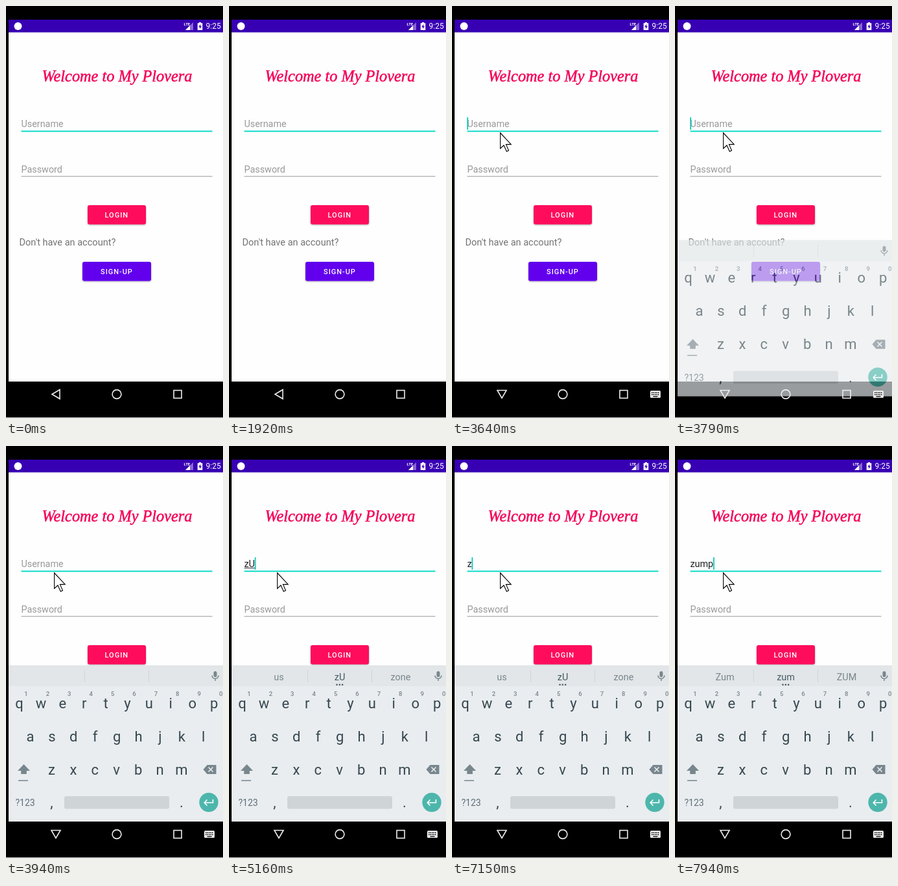
Write an HTML page that moves like this. It is 335x633 px and loops after 8000 ms.

```html
<!DOCTYPE html>
<html lang="en">
<head>
<meta charset="utf-8">
<title>Login screen</title>
<style>
  html, body { margin: 0; width: 100%; height: 100%; overflow: hidden; background: #000; }
  svg { display: block; width: 335px; height: 633px; }
  text { font-family: Roboto, sans-serif; white-space: pre; }
  .title { font: italic 24.3px "Liberation Serif", serif; fill: #f50057; stroke: #f50057; stroke-width: .5; text-anchor: middle; }
  .field { font-size: 14.4px; }
  .hint { fill: #999; }
  .button { font-size: 11px; font-weight: 500; letter-spacing: 1px; fill: #fff; }
  .key { font-size: 22px; fill: #37474f; text-anchor: middle; }
  .digit { font-size: 9.5px; font-weight: 500; fill: #78868d; text-anchor: middle; }
  .word { font-size: 14.4px; fill: #78868d; text-anchor: middle; }
  .word.main { fill: #455a64; }
</style>
</head>
<body>
<svg viewBox="0 0 335 633">
  <defs>
    <filter id="shadow" x="-10%" y="-20%" width="120%" height="150%">
      <feDropShadow dx="0" dy="1" stdDeviation=".8" flood-opacity=".35"/>
    </filter>
  </defs>
  <rect width="335" height="633"/>
  <rect y="632" width="335" height="1" fill="#ccc"/>
  <rect x="4" y="40" width="331" height="537" fill="#fefefe"/>

  <!-- Status bar -->
  <rect x="4" y="21" width="331" height="19.5" fill="#3700b3"/>
  <g fill="#fff">
    <circle cx="18.5" cy="31" r="6"/>
    <text x="274.5" y="30" font-size="6" font-weight="700">LTE</text>
    <path d="M289 25V37H277Z" opacity=".4"/>
    <path d="M284 30V37H277Z"/>
    <path d="M298 25h3v1.3h2.3v10.7h-7.6V26.300H298Z"/>
    <path d="M300.300 28l-3 4.200h1.900v3l2.700-4.200h-1.600Z" fill="#3700b3"/>
    <text x="308.5" y="35.3" font-size="12">9:25</text>
  </g>

  <!-- Form -->
  <text class="title" x="171.500" y="115.500">Welcome to My Plovera</text>
  <text class="field hint" id="hint" x="23.400" y="186.300">Username</text>
  <text class="field" id="typed" x="23.400" y="186.300" fill="#212121"></text>
  <rect id="underline" x="23.500" y="187" height="1" fill="#333"/>
  <rect id="caret" y="171" width="1.700" height="19" fill="#03c9b6"/>
  <rect x="23.500" y="191.500" width="295" height="1.900" fill="#03dac5"/>
  <text class="field hint" x="23.400" y="255.600">Password</text>
  <rect x="23.500" y="261.300" width="295" height="1" fill="#999"/>
  <rect x="126" y="306" width="90" height="29.500" rx="3" fill="#ff0a5c" filter="url(#shadow)"/>
  <text class="button" x="152.500" y="325">LOGIN</text>
  <text x="20.500" y="368" font-size="14.550" fill="#737373">Don't have an account?</text>
  <rect x="118" y="393" width="106" height="29.500" rx="3" fill="#6200ee" filter="url(#shadow)"/>
  <text class="button" x="146" y="412">SIGN-UP</text>

  <!-- Soft keyboard -->
  <g id="keyboard">
    <rect x="4" y="337" width="331" height="240" fill="#e9edf0"/>
    <rect x="4" y="337" width="331" height="32" fill="#e2e6e8"/>
    <path d="M121.500 344V363M220.500 344V363" stroke="#cfd4d7"/>
    <g id="keys"></g>
    <g id="suggestions">
      <text class="word" x="77" y="359.500"></text>
      <text class="word main" x="171" y="359.500"></text>
      <text class="word" x="265" y="359.500"></text>
      <path d="M166.500 366.700h.01M170.800 366.700h.01M175.100 366.700h.01" stroke="#455a64" stroke-width="2.600" stroke-linecap="round"/>
    </g>
    <g fill="#78868d">
      <rect x="320.500" y="346" width="5" height="9" rx="2.500"/>
      <path d="M318 352.500a5 5 0 0 0 10 0M323 357.500V361" fill="none" stroke="#78868d" stroke-width="1.500"/>
      <path d="M27.500 489L37 499H31.800V504H23.200V499H18Z"/>
      <rect x="19" y="513.300" width="15" height="1.500"/>
      <path d="M310.500 490H324.500V504H310.500L304.500 497Z"/>
    </g>
    <path d="M312.500 493.500l7 7m0-7l-7 7" stroke="#e9edf0" stroke-width="1.600"/>
    <text x="14.500" y="553" font-size="14" fill="#5f6f77">?123</text>
    <rect x="90" y="538" width="162" height="19.500" rx="3" fill="#cfd4d7"/>
    <circle cx="313" cy="547.500" r="14.700" fill="#4db6ac"/>
    <path d="M319.500 543V548H306.500M310.500 543.500L306.200 548L310.500 552.500" fill="none" stroke="#fff" stroke-width="1.600"/>
  </g>

  <!-- Navigation bar -->
  <g fill="none" stroke="#eee" stroke-width="1.600">
    <path id="back"/>
    <circle cx="171" cy="596.500" r="6.900"/>
    <rect x="259" y="590.500" width="12" height="12"/>
  </g>
  <g id="imeIcon">
    <rect x="306" y="591" width="16" height="11" rx="1.500" fill="#eee"/>
    <path d="M308 594H320M308 597H320" stroke="#000" stroke-width="1.500" stroke-dasharray="1.500 1"/>
    <path d="M310.500 600H317.500" stroke="#000" stroke-width="1.300"/>
  </g>

  <path id="pointer" d="M.6 1V25L6 20L10.300 29.500L13.500 28L9.400 18.600H17.200Z" fill="#fff" stroke="#000" stroke-width="1.100"/>
</svg>
<script>
const LOOP = 8000;
const $ = id => document.getElementById(id);
const show = (el, on) => el.setAttribute("visibility", on ? "visible" : "hidden");

function addText(cls, x, y, label) {
  const el = document.createElementNS("http://www.w3.org/2000/svg", "text");
  el.setAttribute("class", cls);
  el.setAttribute("x", x);
  el.setAttribute("y", y);
  el.textContent = label;
  $("keys").append(el);
}

const PITCH = 33.4;
[["qwertyuiop", 20.5, 402.5], ["asdfghjkl", 37.5, 453.5], ["zxcvbnm", 70.5, 504.5]]
  .forEach(([row, x, y]) => [...row].forEach((c, i) => addText("key", x + i * PITCH, y, c)));
[..."1234567890"].forEach((c, i) => addText("digit", 31 + i * PITCH, 384, c));
addText("key", 70.5, 555, ",");
addText("key", 271, 555, ".");

// Tracks of [start time, value]; each value holds until the next start.
const caretToggles = [430, 960, 1520, 1920, 2480, 3030, 3490, 3940, 4500, 5590, 5870, 6400, 6900];
const typing = [[0, ""], [4640, "z"], [5010, "zU"], [5870, ""], [7150, "z"],
  [7420, "zu"], [7660, "zum"], [7940, "zump"]];
const words = [[0, ""], [4890, "us z is"], [5160, "us zU zone"], [7300, "us z is"],
  [7540, "us zu zone"], [7810, "Zum zum ZUM"]];
const underlined = [[0, false], [5160, true], [5870, false], [7540, true],
  [7660, false], [7810, true], [7940, false]];
const pointerAt = [[0, null], [2730, [29, 210]], [2880, [55, 207]], [3030, [74, 194]]];

const valueAt = (track, t) => track.findLast(([start]) => start <= t)[1];

function render(t) {
  const typed = valueAt(typing, t);
  $("typed").textContent = typed;
  show($("hint"), !typed);
  const width = typed ? $("typed").getComputedTextLength() : 0;
  $("caret").setAttribute("x", 23.3 + width);
  show($("caret"), caretToggles.filter(start => start <= t).length % 2 === 1);
  $("underline").setAttribute("width", width);
  show($("underline"), valueAt(underlined, t));

  const line = valueAt(words, t);
  const parts = line.split(" ");
  show($("suggestions"), line !== "");
  $("suggestions").querySelectorAll("text").forEach((el, i) => el.textContent = parts[i] || "");

  const sliding = t < 3940;
  $("keyboard").setAttribute("display", t < 3790 ? "none" : "inline");
  $("keyboard").setAttribute("opacity", sliding ? 0.66 : 1);
  $("keyboard").setAttribute("transform", `translate(0 ${sliding ? 22.7 : 0})`);

  const imeOpen = t >= 3640;
  $("back").setAttribute("d", imeOpen ? "M70 590.500H84L77 602.500Z" : "M83 589.500V603.500L71 596.500Z");
  show($("imeIcon"), imeOpen);

  const pos = valueAt(pointerAt, t);
  show($("pointer"), pos);
  if (pos) $("pointer").setAttribute("transform", `translate(${pos})`);
}

const origin = performance.now();
function tick() {
  render((performance.now() - origin) % LOOP);
  requestAnimationFrame(tick);
}
tick();
</script>
</body>
</html>
```
